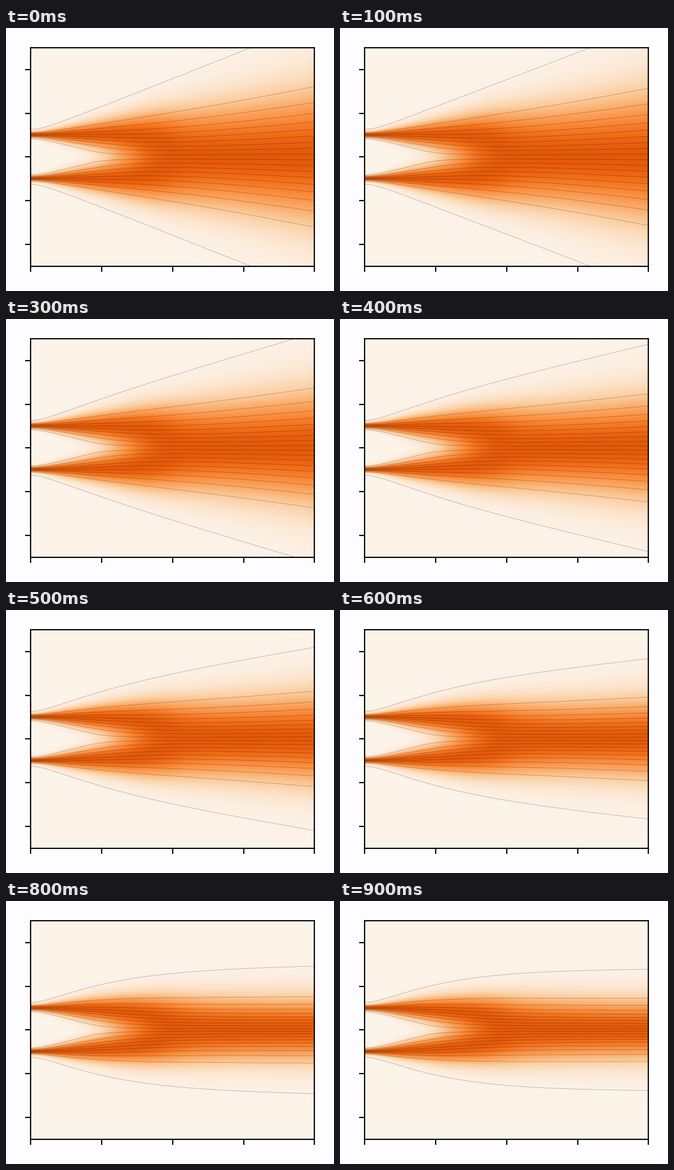
A matplotlib script that plays this animation: 600x480 px, repeating every 1 s.

```python
import math

import matplotlib.pyplot as plt
import numpy as np
from matplotlib.animation import FuncAnimation

W, H, DPI = 600, 480, 200
LEFT, RIGHT, TOP, BOTTOM = 45.4, 564.2, 36.0, 434.5
FRAMES, INTERVAL = 10, 100
T_MAX, Y_MAX = 2.0, 5.0
PEAK_WIDTH = 0.1
PEAK_TONE = 0.68

erf = np.vectorize(math.erf)


def normal_cdf(x):
    return 0.5 * (1 + erf(x / math.sqrt(2)))


def spread(t):
    return np.sqrt(t**2 + PEAK_WIDTH**2)


def mixture_cdf(x, t):
    s = spread(t)
    return 0.5 * (normal_cdf((x - 1) / s) + normal_cdf((x + 1) / s))


def invert(cdf, target):
    """Solve cdf(x) = target elementwise by bisection."""
    low = np.full(target.shape, -12.0)
    high = -low
    for _ in range(36):
        mid = (low + high) / 2
        below = cdf(mid) < target
        low = np.where(below, mid, low)
        high = np.where(below, high, mid)
    return (low + high) / 2


def scale(t, blend):
    """Blend from unscaled noise to the variance-preserving scale."""
    return 1 - blend + blend / np.sqrt(1 + t**2)


def blend_at(frame):
    u = (3 * frame + 1) / 29
    return (1 - math.cos(math.pi * u)) / 2


def density_image(blend):
    s = spread(pixel_t)
    x = pixel_y[:, None] / scale(pixel_t, blend)
    p = np.exp(-((x - 1) / s) ** 2 / 2) + np.exp(-((x + 1) / s) ** 2 / 2)
    p /= p.max(axis=0)
    return 0.992 * plt.cm.Oranges(PEAK_TONE * p)[..., :3]


# Flow lines end at evenly spaced quantiles of the widest Gaussian and
# keep their share of the probability mass at every earlier time.
line_t = np.linspace(0, T_MAX, 160)
ends = T_MAX * invert(normal_cdf, np.linspace(0.001, 0.999, 20))
mass = np.repeat(mixture_cdf(ends, T_MAX)[:, None], line_t.size, axis=1)
paths = invert(lambda x: mixture_cdf(x, line_t), mass)

cols, rows = 519, 399
pixel_t = (np.arange(cols) + 0.5) / cols * T_MAX
pixel_y = Y_MAX - (np.arange(rows) + 0.5) / rows * 2 * Y_MAX

fig = plt.figure(figsize=(W / DPI, H / DPI), dpi=DPI, facecolor="#fdfcff")
ax = fig.add_axes([LEFT / W, 1 - BOTTOM / H, (RIGHT - LEFT) / W, (BOTTOM - TOP) / H])
image = ax.imshow(density_image(blend_at(0)), extent=(0, T_MAX, -Y_MAX, Y_MAX),
                  aspect="auto")
lines = [ax.plot([], [], color="black", lw=0.25, alpha=0.35)[0] for _ in paths]
ax.set(xlim=(0, T_MAX), ylim=(-Y_MAX, Y_MAX),
       xticks=np.arange(0, 2.1, 0.5), yticks=range(-4, 5, 2))
ax.tick_params(labelbottom=False, labelleft=False)


def update(frame):
    blend = blend_at(frame)
    image.set_data(density_image(blend))
    for line, path in zip(lines, paths):
        line.set_data(line_t, path * scale(line_t, blend))
    return [image, *lines]


anim = FuncAnimation(fig, update, frames=FRAMES, interval=INTERVAL,
                     init_func=lambda: update(0), repeat=True, repeat_delay=0)
plt.show()
```
